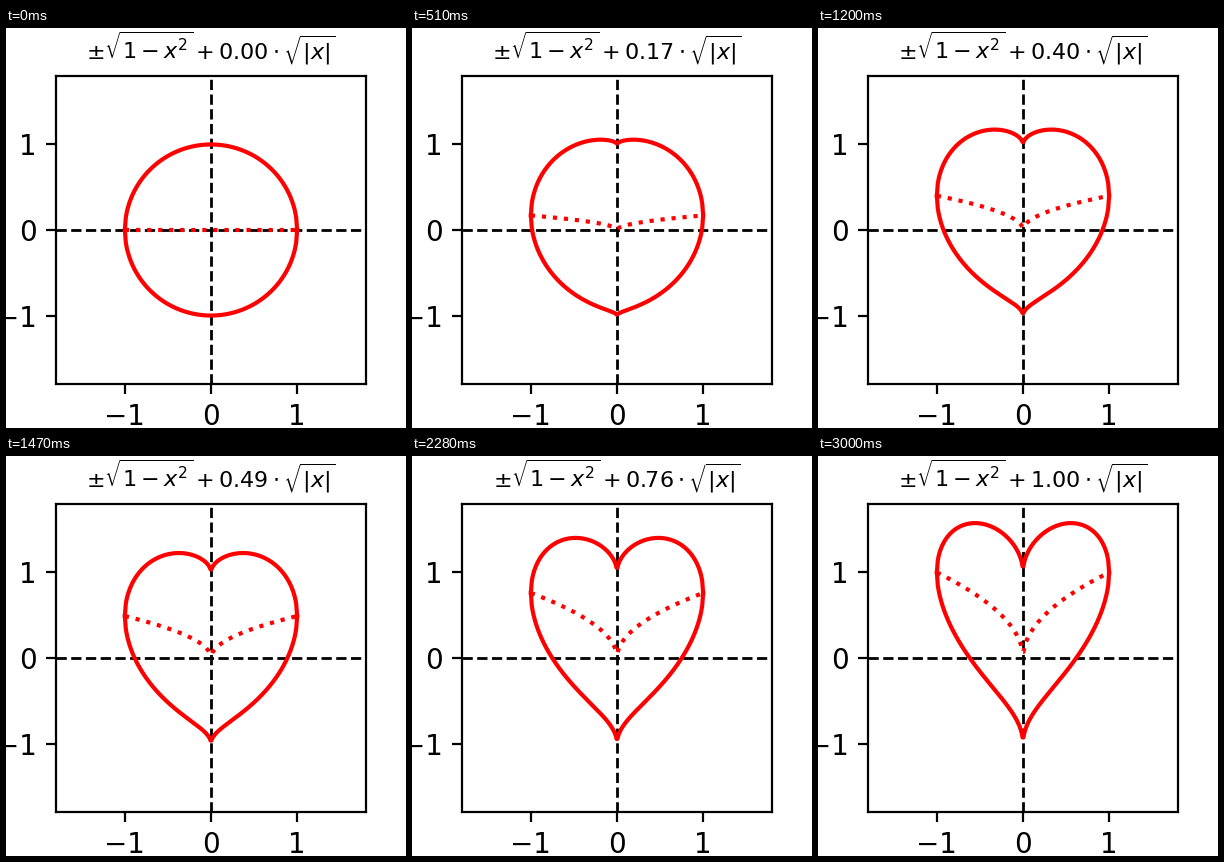
Write a matplotlib script that moves like this. It is 400 px wide and 400 px high and loops after 6.3 s.

```python
import matplotlib.pyplot as plt
import numpy as np
from matplotlib.animation import FuncAnimation

INTERVAL = 30      # ms
FRAMES = 210       # 6300 ms in all
GROW_FRAMES = 100  # then the finished heart holds

x = np.linspace(-1, 1, 200)
arc = np.sqrt(1 - x**2)
cusp = np.sqrt(np.abs(x))

fig, ax = plt.subplots(figsize=(2, 2), dpi=200)
ax.set(xlim=(-1.8, 1.8), ylim=(-1.8, 1.8), xticks=[-1, 0, 1], yticks=[-1, 0, 1])
ax.axhline(0, color="black", linestyle="--", linewidth=1)
ax.axvline(0, color="black", linestyle="--", linewidth=1)

upper, = ax.plot(x, arc, color="red")
lower, = ax.plot(x, -arc, color="red")
middle, = ax.plot(x, 0 * x, color="red", linestyle=":")
title = ax.set_title("", fontsize=8)


def update(frame):
    a = min(frame / GROW_FRAMES, 1)
    upper.set_ydata(arc + a * cusp)
    lower.set_ydata(-arc + a * cusp)
    middle.set_ydata(a * cusp)
    title.set_text(rf"$\pm\sqrt{{1-x^2}} + {a:.2f} \cdot \sqrt{{|x|}}$")
    return upper, lower, middle, title


animation = FuncAnimation(fig, update, frames=FRAMES, interval=INTERVAL,
                          repeat=True, repeat_delay=0)
plt.show()
```
